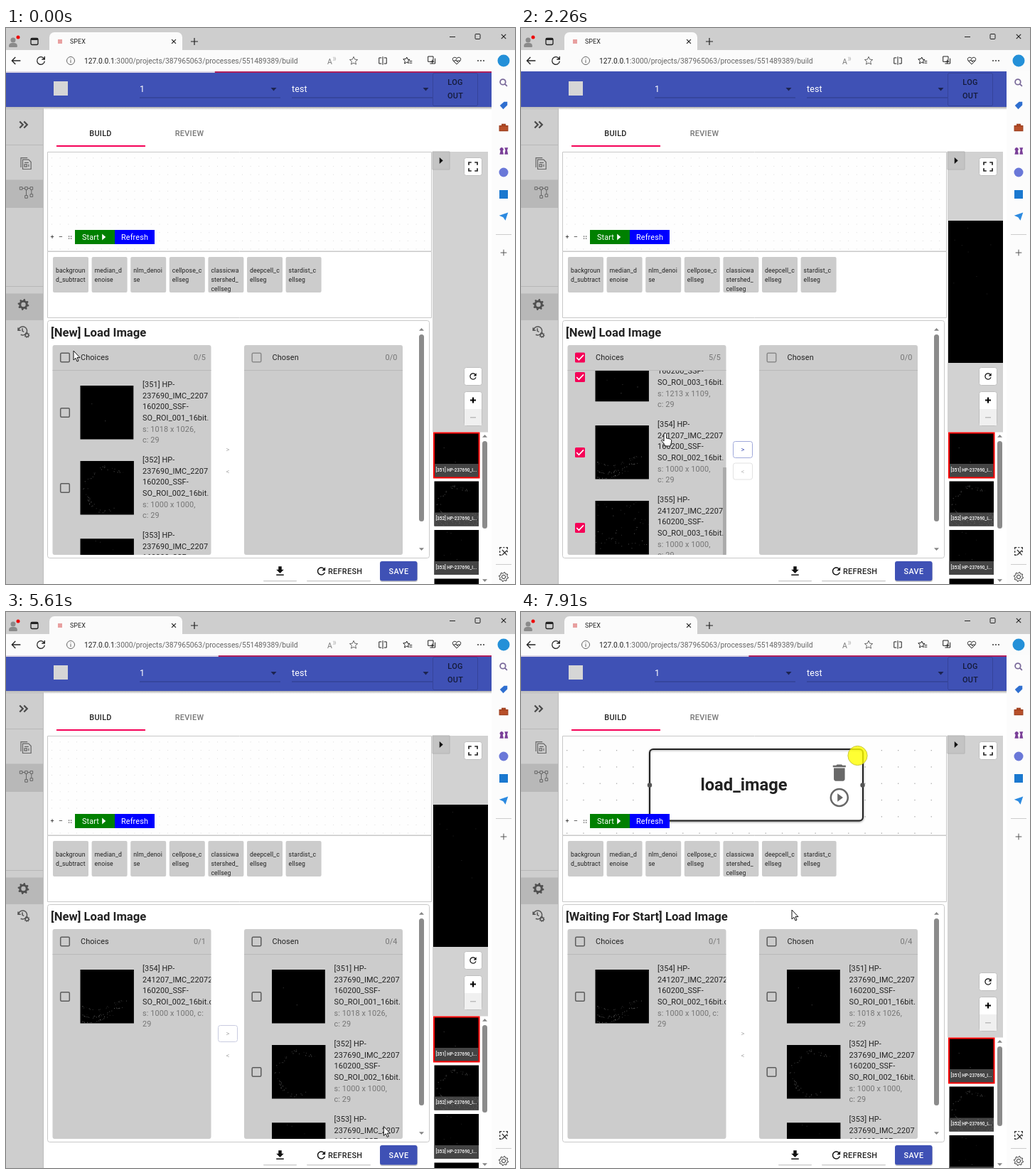
Recreate the animation shown at these times as an HTML page with a canvas. Size 716 px wide and 782 px high, loop 8000 ms.

```html
<!DOCTYPE html>
<html lang="en">
<head>
<meta charset="utf-8">
<title>SPEX</title>
<style>
  html, body { margin: 0; width: 100%; height: 100%; overflow: hidden; background: #fff; }
  canvas { display: block; }
</style>
</head>
<body>
<canvas id="stage" width="716" height="782"></canvas>
<script>
const LOOP = 8000;
const ctx = document.getElementById('stage').getContext('2d');
const INK = '#222', GREY = '#757575', PANE = '#ccc', BLUE = '#3f51b5', PINK = '#f50057', LINE = '#c8c8c8';

const ICONS = {
  refresh: 'M17.65 6.35C16.2 4.9 14.21 4 12 4c-4.42 0-7.99 3.58-7.99 8s3.57 8 7.99 8c3.73 0 6.84-2.55 7.73-6h-2.08c-.82 2.33-3.04 4-5.65 4-3.31 0-6-2.69-6-6s2.69-6 6-6c1.66 0 3.14.69 4.22 1.78L13 11h7V4z',
  download: 'M19 9h-4V3H9v6H5l7 7 7-7zM5 18v2h14v-2H5z',
  trash: 'M6 19c0 1.1.9 2 2 2h8c1.1 0 2-.9 2-2V7H6zM19 4h-3.5l-1-1h-5l-1 1H5v2h14z',
  play: 'M10 16.5l6-4.5-6-4.5z',
  chevrons: 'M5 6l6 6-6 6M13 6l6 6-6 6',
  fullscreen: 'M4 9V4h5M15 4h5v5M20 15v5h-5M9 20H4v-5',
  star: 'M12 3l2.7 6 6.3.6-4.8 4.3 1.4 6.3-5.6-3.2-5.6 3.2 1.4-6.3L3 9.6l6.3-.6z',
  back: 'M21 12H4M11 5l-7 7 7 7',
  reload: 'M19 8a8 8 0 1 0 1 5M20 3v6h-6',
  cross: 'M5 5l14 14M19 5L5 19',
  plus: 'M12 4v16M4 12h16',
  split: 'M9 5H3v14h6M15 5h6v14h-6M12 2v20',
  favorites: 'M10 4l2 5 5 .5-4 3 1 5-4-2-5 3 1-6-4-4 6-.5zM16 13h6M16 17h6',
  collections: 'M4 3h11v11H4zM8 18h11V7M13 10v8M9 14h8',
  heart: 'M12 20L4 12C0 5 8 2 12 7c4-5 12-2 8 5zM5 12h4l2-3 2 6 2-3h4',
  search: 'M15 15l6 6M17 10a7 7 0 1 1-14 0a7 7 0 1 1 14 0',
  tag: 'M3 12L13 3h8v8L11 21z',
  briefcase: 'M2 8h20v12H2zM8 8V4h8v4',
  pieces: 'M3 21h9l-2-8a4 4 0 1 0-5 0zM14 21h8l-2-9 2-6h-8l2 6z',
  plane: 'M2 10L22 3l-6 18-5-7z',
  clip: 'M4 8V4h4M11 4h3M17 4h3v4M20 11v3M4 11v4M4 18v2h4M9 9l10 11M19 10L9 20',
  report: 'M6 5h10l4 4v12H6zM3 18V2h11M9 10h7M9 13h4v4H9zM16 13v4',
  tree: 'M2 4h4v4H2zM18 4h4v4h-4zM10 4h4v4h-4zM6 6h4M14 6h4M20 8v7M18 15h4v4h-4zM12 8v9M10 17h4v4h-4z',
  history: 'M4 6v5h5M5 10a8 8 0 1 1 4 9M12 7v5l3 2',
  hand: 'M4 0c1-.8 2.6 0 2.6 1.4V7c3 .2 6 .8 7 2.5.5 2-.5 5-1.5 8.5H5C3 14 1 12-.5 10.5c0-1.5 2-1.5 3.5.5V1.4C3 .7 3.3.2 4 0z',
  arrow: 'M0 0v13l3-2.7 2 4.7 2-.9-2-4.5h4z',
};
for (const name in ICONS) ICONS[name] = new Path2D(ICONS[name]);

function box(x, y, w, h, fill, stroke, radius = 0, width = 1) {
  ctx.beginPath();
  ctx.roundRect(x, y, w, h, radius);
  if (fill) { ctx.fillStyle = fill; ctx.fill(); }
  if (stroke) { ctx.strokeStyle = stroke; ctx.lineWidth = width; ctx.stroke(); }
}
function disc(x, y, r, fill, stroke, width = 1) {
  box(x - r, y - r, 2 * r, 2 * r, fill, stroke, r, width);
}
// y is the vertical centre of the capitals
function text(s, x, y, { size = 10.88, weight = 400, color = INK, align = 'left', spacing = 0.0107 } = {}) {
  ctx.font = `${weight} ${size}px Roboto, sans-serif`;
  ctx.letterSpacing = `${spacing * size}px`;
  ctx.textAlign = align;
  ctx.fillStyle = color;
  ctx.fillText(s, x, y + 0.36 * size);
}
function icon(name, x, y, size, color, stroke = 0) {
  ctx.save();
  ctx.translate(x - size / 2, y - size / 2);
  ctx.scale(size / 24, size / 24);
  ctx.fillStyle = ctx.strokeStyle = color;
  ctx.lineWidth = stroke * 24 / size;
  stroke ? ctx.stroke(ICONS[name]) : ctx.fill(ICONS[name]);
  ctx.restore();
}
function triangle(x, y, r, angle, color) {
  ctx.beginPath();
  for (const [dx, dy] of [[0.6, 0], [-0.5, -1], [-0.5, 1]])
    ctx.lineTo(x + r * (dx * Math.cos(angle) - dy * Math.sin(angle)), y + r * (dx * Math.sin(angle) + dy * Math.cos(angle)));
  ctx.fillStyle = color;
  ctx.fill();
}
const DOWN = Math.PI / 2, UP = -DOWN;
function gear(x, y, r, color, hollow) {
  ctx.beginPath();
  for (let i = 0; i < 32; i++) {
    const a = (i + 0.5) * Math.PI / 16, k = i % 4 < 2 ? r : r * 0.76;
    ctx.lineTo(x + k * Math.cos(a), y + k * Math.sin(a));
  }
  ctx.closePath();
  ctx.moveTo(x + r * 0.4, y);
  ctx.arc(x, y, r * 0.4, 0, 7);
  ctx.fillStyle = ctx.strokeStyle = color;
  ctx.lineWidth = 1;
  hollow ? ctx.stroke() : ctx.fill('evenodd');
}
function clipped(x, y, w, h, draw) {
  ctx.save();
  ctx.beginPath();
  ctx.rect(x, y, w, h);
  ctx.clip();
  draw();
  ctx.restore();
}
function random(seed) {
  return () => {
    seed = (seed * 1664525 + 1013904223) >>> 0;
    return seed / 4294967296;
  };
}

// Dim specks of the microscope pictures, scattered or along a shape
const FILES = [
  { id: 351, code: 237690, roi: 1, dims: [1018, 1026], specks: 2 },
  { id: 352, code: 237690, roi: 2, dims: [1000, 1000], specks: 60, shape: 'ring' },
  { id: 353, code: 237690, roi: 3, dims: [1213, 1109], specks: 8 },
  { id: 354, code: 241207, roi: 2, dims: [1000, 1000], specks: 80, shape: 'waves' },
  { id: 355, code: 241207, roi: 3, dims: [1000, 1000], specks: 60 },
];
function picture(file, x, y, w, h) {
  box(x, y, w, h, '#000');
  const rnd = random(file.id * 7919);
  for (let i = 0; i < file.specks; i++) {
    let u = rnd(), v = rnd();
    if (file.shape === 'ring') {
      const a = 1.2 + u * 4.3, r = 0.36 + v * 0.09;
      u = 0.5 + r * Math.cos(a);
      v = 0.53 + r * Math.sin(a);
    } else if (file.shape === 'waves') {
      u *= 0.9 - 0.3 * v;
      v = 0.68 + 0.12 * Math.floor(v * 3) + 0.1 * Math.sin(u * 5 + v) - 0.05 * rnd();
    }
    ctx.fillStyle = `rgba(210,210,210,${0.08 + 0.4 * rnd()})`;
    ctx.fillRect(x + u * w, y + Math.min(v, 0.98) * h, 1, 1);
  }
}

function checkbox(x, y, state, color = '#5c5c5c') {
  if (!state) return box(x - 6.3, y - 6.3, 12.6, 12.6, null, color, 1.5, 1.5);
  box(x - 7, y - 7, 14, 14, PINK, null, 1.5);
  ctx.beginPath();
  if (state === 'some') { ctx.moveTo(x - 4, y); ctx.lineTo(x + 4, y); }
  else { ctx.moveTo(x - 4.8, y); ctx.lineTo(x - 1.6, y + 3.3); ctx.lineTo(x + 5, y - 3.6); }
  ctx.strokeStyle = '#fff';
  ctx.lineWidth = 1.6;
  ctx.stroke();
}
function fileList(x, title, files, { checked = () => false, scroll = 0, thumb = false } = {}) {
  const count = files.filter(checked).length;
  const wide = files.length < 3;
  box(x, 446, 223, 295, PANE, null, 3);
  checkbox(x + 17.5, 463.5, count === 0 ? false : count === files.length || 'some', files.length ? '#5c5c5c' : '#8a8a8a');
  text(title, x + 39.5, 463);
  text(`${count}/${files.length}`, x + 215.5, 463, { color: GREY, align: 'right' });
  box(x, 481, 223, 1, '#b9b9b9');
  clipped(x, 482, 223, 259, () => files.forEach((file, i) => {
    const y = 503 + 106 * i - scroll;
    const [w, h] = file.dims, longest = Math.max(w, h), height = 75.4 * h / longest;
    checkbox(x + 17.5, y + 38, checked(file));
    picture(file, x + 39, y + (75.4 - height) / 2, 75.4 * w / longest, height);
    clipped(x + 120, 482, wide ? 103 : 99, 259, () => {
      const size = `s: ${w} x ${h},`;
      const lines = [`[${file.id}] HP-`, `${file.code}_IMC_22072`, '160200_SSF-', `SO_ROI_00${file.roi}_16bit.ome`];
      lines.forEach((line, n) => text(line, x + 126.5, y - 2 + 15.6 * n));
      const info = wide ? [size + ' c:', '29'] : [size, 'c: 29'];
      info.forEach((line, n) => text(line, x + 126.5, y + 60.6 + 15.6 * n, { color: GREY }));
    });
    if (thumb) box(x + 219, 481 + scroll * 0.524, 4, 147, '#aaa');
  }));
}
function transferButton(label, y, border, color) {
  if (border) box(298.5, y - 11.5, 27, 23, '#fff', border, 3);
  text(label, 312, y, { size: 9.5, color, align: 'center' });
}

function browser() {
  box(0, 0, 716, 31, '#cecece');
  box(0, 31, 716, 30, '#fbfbfb');
  box(683, 61, 33, 721, '#fcfcfc');
  box(61, 6, 187, 26, '#fbfbfb', null, [7, 7, 0, 0]);
  disc(10, 17, 3.5, '#8a8a8a');
  box(4, 21, 12, 6, '#8a8a8a', null, [6, 6, 2, 2]);
  disc(17, 13, 2.5, '#e00');
  box(35, 14.5, 10, 9, null, '#222', 2, 1.3);
  box(35, 14, 10, 3, '#222');
  box(73, 16, 6, 6, '#e8a0a0');
  text('SPEX', 90, 19, { size: 9, spacing: 0 });
  icon('cross', 236, 19, 10, '#222', 1.2);
  icon('plus', 265, 19, 15, '#222', 1.2);
  box(624, 12, 8, 1, '#222');
  box(660, 8.5, 7, 7, null, '#222', 1);
  icon('cross', 700, 12, 11, '#222', 1.1);
  icon('back', 14, 46, 17, '#222', 1.3);
  icon('reload', 49, 46, 16, '#222', 1.3);
  disc(91, 46, 5.5, null, '#666');
  box(90.5, 45, 1, 4, '#666');
  box(90.5, 43, 1, 1, '#666');
  text('127.0.0.1', 110, 46, { size: 10.3, spacing: 0 });
  const host = ctx.measureText('127.0.0.1').width;
  text(':3000/projects/387965063/processes/551489389/build', 110 + host, 46, { size: 10.3, spacing: 0, color: '#666' });
  text('A', 452, 47, { size: 10.5, color: '#777', spacing: 0 });
  text('))', 460, 43, { size: 6, color: '#777', spacing: 0 });
  icon('star', 489, 46, 15, '#666', 1);
  icon('split', 530, 46, 14, '#222', 1);
  icon('favorites', 565, 46, 15, '#222', 1);
  icon('collections', 599, 46, 16, '#222', 1);
  icon('heart', 634, 46, 15, '#222', 1);
  for (const x of [664, 668, 672]) disc(x, 46, 0.9, '#222');
  disc(700, 46, 8.5, '#2490d8');
  icon('search', 700, 77, 13, '#7a6a9a', 1.8);
  icon('tag', 700, 109, 14, '#2f6fd0');
  icon('briefcase', 700, 140, 14, '#b8502a');
  icon('briefcase', 700, 140, 14, '#9c3d1c', 1.2);
  icon('pieces', 700, 172, 15, '#7a3f98');
  disc(700, 203, 6.5, '#6a78d8');
  box(694, 228, 12, 12, '#1a78cf');
  icon('plane', 700, 265, 15, '#2c8ae0');
  box(689, 290, 22, 1, '#ccc');
  icon('plus', 700, 316, 13, '#555', 1);
  icon('clip', 700, 736, 16, '#333', 1.3);
  box(689, 754, 22, 1, '#ccc');
  gear(700, 772, 6.5, '#333', true);
}

function pageFrame() {
  box(0, 61, 683, 721, '#fff');
  const shadow = ctx.createLinearGradient(0, 111, 0, 115);
  shadow.addColorStop(0, '#aaa');
  shadow.addColorStop(1, 'rgba(170,170,170,0)');
  box(0, 113, 52, 669, '#cecece');
  box(0, 111, 683, 4, shadow);
  box(0, 61, 683, 50, BLUE);
  box(67, 75, 20, 20, '#d6d6d6');
  for (const [label, x] of [['1', 188], ['test', 402]]) {
    text(label, x, 86, { size: 12.43, color: '#fff' });
    box(x, 97.5, 198, 1, '#2f3c88');
    triangle(x + 188.5, 86, 4, DOWN, '#1c2450');
  }
  box(600.5, 63.5, 63, 46, null, 'rgba(0,0,0,.15)', 2);
  for (const [label, y] of [['LOG', 76], ['OUT', 95]])
    text(label, 632, y, { weight: 500, color: '#141a38', align: 'center', spacing: 0.0286 });

  box(0, 213.5, 52, 39.5, '#b8b8b8');
  box(0, 373.5, 52, 37.5, '#b8b8b8');
  for (const y of [164, 363]) box(0, y, 52, 1, '#b8b8b8');
  box(52, 113, 1, 669, '#bdbdbd');
  icon('chevrons', 24.5, 136, 18, '#4a4a4a', 2.2);
  icon('report', 28.5, 191, 20, '#666', 1.2);
  icon('tree', 28.5, 231, 22, '#666', 1);
  gear(24.5, 389, 8, '#505050');
  icon('history', 23, 426, 18, '#555', 1.5);
  gear(29.5, 432, 4, '#555');

  text('BUILD', 133, 148, { weight: 500, align: 'center', spacing: 0.0286 });
  text('REVIEW', 258, 148, { weight: 500, color: GREY, align: 'center', spacing: 0.0286 });
  box(71, 165, 125, 2, PINK);
}

function node(selected) {
  const grow = selected ? 0.5 : 0;
  ctx.save();
  if (selected) {
    ctx.shadowColor = 'rgba(0,0,0,.35)';
    ctx.shadowBlur = 3;
    ctx.shadowOffsetY = 1;
  }
  box(181.5 - grow, 194 - 2 * grow, 299 + 2 * grow, 99 + 3 * grow, '#fff', selected ? '#222' : '#aaa', 5, selected ? 2 : 1);
  ctx.restore();
  text('load_image', 313.5, 242, { size: selected ? 23.7 : 22.3, weight: 700, align: 'center', spacing: 0 });
  for (const x of [181, 480.5]) disc(x, 243.5, 3.2, '#555');
  icon('trash', 447.8, 226, 31, '#686868');
  icon('play', 447.8, 261, 31, '#686868');
  disc(447.8, 261, 12, null, '#686868', 2.5);
  disc(selected ? 473.5 : 474, selected ? 202 : 200, 13.6, 'rgba(255,255,0,.8)', '#c9c63c', 1);
}

function workflow(hasNode, selected) {
  box(58.5, 174.5, 540, 139.5, '#fefefe', LINE);
  clipped(59, 175, 539, 138, () => {
    const gap = hasNode ? 23.3 : 11.65, dot = hasNode ? 1.3 : 1;
    ctx.fillStyle = hasNode ? '#aaa' : '#dcdcdc';
    for (let y = 194 - gap; y < 314; y += gap)
      for (let x = 64; x < 598; x += gap) ctx.fillRect(x, y, dot, dot);
    if (hasNode) node(selected);
  });
  box(59, 284, 38, 20, '#fefefe');
  text('+', 65, 294, { size: 9, align: 'center' });
  text('–', 77, 294, { size: 9, align: 'center' });
  for (const x of [88, 91]) for (const y of [292.5, 295.5]) box(x, y, 1.2, 1.2, '#333');
  box(97, 284, 56, 20, '#008000');
  box(153, 284, 56, 20, '#00f');
  text('Start', 107, 294, { color: '#fff' });
  triangle(137.5, 294, 4.6, 0, '#fff');
  text('Refresh', 162, 294, { color: '#fff' });
}

function blocks(names) {
  box(58.5, 314.5, 540, 93, '#fff', LINE);
  names.forEach((name, i) => {
    const x = 66 + 54.6 * i;
    box(x, 322, 50, 50, PANE, null, 2);
    clipped(x, 322, 50, 50, () => name.split(' ').forEach((line, n) =>
      text(line, x + 4, 341 + 13.05 * n, { size: 8.7, spacing: 0.0107 })));
  });
}
const START_BLOCKS = ['load_imag e', 'load_annd ata'];
const NEXT_BLOCKS = ['backgroun d_subtract', 'median_d enoise', 'nlm_denoi se', 'cellpose_c ellseg',
  'classicwa stershed_ cellseg', 'deepcell_c ellseg', 'stardist_c ellseg'];

function scrollbar(x, top, thumbTop, thumbBottom, bottom) {
  triangle(x, top, 3.5, UP, '#858585');
  box(x - 3.5, thumbTop, 7, thumbBottom - thumbTop, '#8b8b8b', null, 3.5);
  triangle(x, bottom, 3.5, DOWN, '#858585');
}

function viewer(shift, imageColor) {
  box(600, 174, 78, 394.5 + shift, '#d2d2d2');
  box(600, 174, 24, 25, '#c4c4c4', '#b4b4b4');
  triangle(612, 186.5, 4.5, 0, '#111');
  if (imageColor) {
    box(601, 271, 77, 200, imageColor);
    const rnd = random(11);
    for (let i = 0; i < 8; i++) box(602 + rnd() * 74, 272 + rnd() * 120, 1, 1, 'rgba(180,180,180,.2)');
  }
  const button = (y, h) => box(644.5, y + 0.5, 25, h, '#fff', '#bfbfbf', 3);
  button(182, 25);
  icon('fullscreen', 657, 195, 18, '#222', 1.7);
  button(477 + shift, 25);
  icon('refresh', 657, 490 + shift, 14, '#111');
  button(511 + shift, 48);
  box(645, 536 + shift, 24, 23, '#f0f0f0');
  icon('plus', 657, 523.5 + shift, 12, '#000', 2);
  box(653, 547 + shift, 8, 1.5, '#bbb');

  clipped(600, 568 + shift, 78, 214 - shift, () => {
    FILES.slice(0, 4).forEach((file, i) => {
      const y = 569 + shift + 68.5 * i;
      picture(file, 602.5, y, 62.5, 63);
      box(602.5, y + 44, 62.5, 19, '#444');
      if (file.shape) {
        const rnd = random(5);
        for (let n = 0; n < 120; n++) box(603 + rnd() * 61, y + 44 + rnd() * 18, 1, 1, 'rgba(200,200,200,.2)');
      }
      text(`[${file.id}] HP-${file.code}_I...`, 604.5, y + 52.7, { size: 6.3, weight: 500, color: '#fff', spacing: 0 });
      if (!i) box(602, y + 0.5, 63.5, 63, null, '#f00', 0, 2);
    });
    scrollbar(673.5, 574 + shift, 581 + shift, 704 + 0.63 * shift, 777);
  });
}

function settings(title, lists) {
  text(title, 63, 428, { size: 16.7, weight: 700, spacing: 0 });
  lists();
  scrollbar(584.5, 424, 431, 694, 733);
  for (const [x, w] of [[361, 49], [422, 92]]) box(x + 1, 777, w - 2, 1.5, '#cfcfcf', null, 1);
  icon('download', 385.5, 764, 18, '#111');
  icon('refresh', 443.5, 764, 17, '#111');
  text('REFRESH', 453, 764, { weight: 500, spacing: 0.0286 });
  box(526, 751, 53, 28, '#c4c4c4', null, 3);
  box(526, 750, 52.5, 27.5, BLUE, null, 3);
  text('SAVE', 552.5, 764, { weight: 500, color: '#fff', align: 'center', spacing: 0.0286 });
}

// The screen advances in discrete steps: returns the step index, -1 before the start
function stepAt(t, start, end, count) {
  if (t < start) return -1;
  return Math.min(count - 1, Math.floor((t - start) / (end - start) * (count - 1) + 0.12));
}

// start, end, steps, destination, pointing hand on arrival
const MOVES = [
  [150, 420, 3, 82, 464, true],
  [1116, 1544, 4, 202, 570, true],
  [2850, 3520, 6, 80, 602, true],
  [3940, 4370, 4, 312, 590, true],
  [4520, 4660, 2, 337, 605, false],
  [4780, 4910, 2, 385, 650, false],
  [5060, 5330, 3, 550, 760, true],
  [5600, 6000, 4, 475, 614, false],
  [6150, 6830, 6, 213, 206, true],
  [7250, 7910, 6, 381, 419, false],
];
function cursor(t) {
  let x = 95, y = 454, hand = false;
  for (const [start, end, steps, toX, toY, toHand] of MOVES) {
    const step = stepAt(t, start, end, steps);
    if (step < 0) break;
    const k = (step + 1) / steps;
    x += (toX - x) * k;
    y += (toY - y) * k;
    hand = k === 1 ? toHand : hand && toHand;
  }
  ctx.save();
  ctx.translate(hand ? x - 4 : x, y);
  const path = ICONS[hand ? 'hand' : 'arrow'];
  ctx.fillStyle = '#fff';
  ctx.fill(path);
  ctx.strokeStyle = '#111';
  ctx.lineWidth = 1;
  ctx.stroke(path);
  ctx.restore();
}

function scrollAt(t) {
  if (t < 1530) return 0;
  if (t < 1670) return 78;
  return 170 + 92 * (stepAt(t, 1830, 2260, 4) + 1) / 4;
}

function progress(t) {
  const left = t < 285 ? 293 + t * 0.8 : t >= 5460 && t < 5860 ? (5860 - t) * 1.2 : t >= 7510 ? 321 + (7910 - t) * 0.6 : null;
  if (left === null) return;
  box(0, 61, 683, 2, '#d9d3e4');
  box(left, 61, 683 - left, 2, '#b01f5c');
}

function draw(t) {
  const reloaded = t >= 5730, selected = t >= 7100, reopened = t >= 7370;
  const open = !reloaded || reopened;
  const moved = t >= 4510;

  browser();
  pageFrame();
  progress(t);
  workflow(reloaded, selected);
  blocks(open ? NEXT_BLOCKS : START_BLOCKS);
  box(58.5, 411.5, 537, 334, '#fff', LINE, 3);

  if (open) {
    const image = reopened || t < 825 ? null : t < 965 ? '#555' : '#000';
    viewer(reopened ? 30 : 0, image);
    settings(reopened ? '[Waiting For Start] Load Image' : '[New] Load Image', () => {
      const isLeft = file => file.id === 354;
      if (moved) {
        fileList(65.5, 'Choices', FILES.filter(isLeft));
        fileList(335, 'Chosen', FILES.filter(file => !isLeft(file)));
      } else {
        const checked = file => t >= 973 && !(t >= 3665 && isLeft(file));
        fileList(65.5, 'Choices', FILES, { checked, scroll: scrollAt(t), thumb: t >= 1530 });
        fileList(335, 'Chosen', []);
      }
      const active = t >= 973 && !moved;
      transferButton('>', 593, active ? '#9fa8da' : moved && !reopened ? '#c9cbe0' : null, active ? BLUE : '#aaa');
      transferButton('<', 623.5, active ? '#e2e2e2' : null, active ? '#bbb' : '#aaa');
    });
  } else {
    box(600.5, 174, 1, 608, LINE);
    box(603, 174, 80, 608, PANE);
    box(63, 417, 527, 324, PANE);
    text('Select block', 327, 578, { align: 'center' });
  }
  cursor(t);
}

function tick() {
  draw(performance.now() % LOOP);
  requestAnimationFrame(tick);
}
tick();
</script>
</body>
</html>
```
